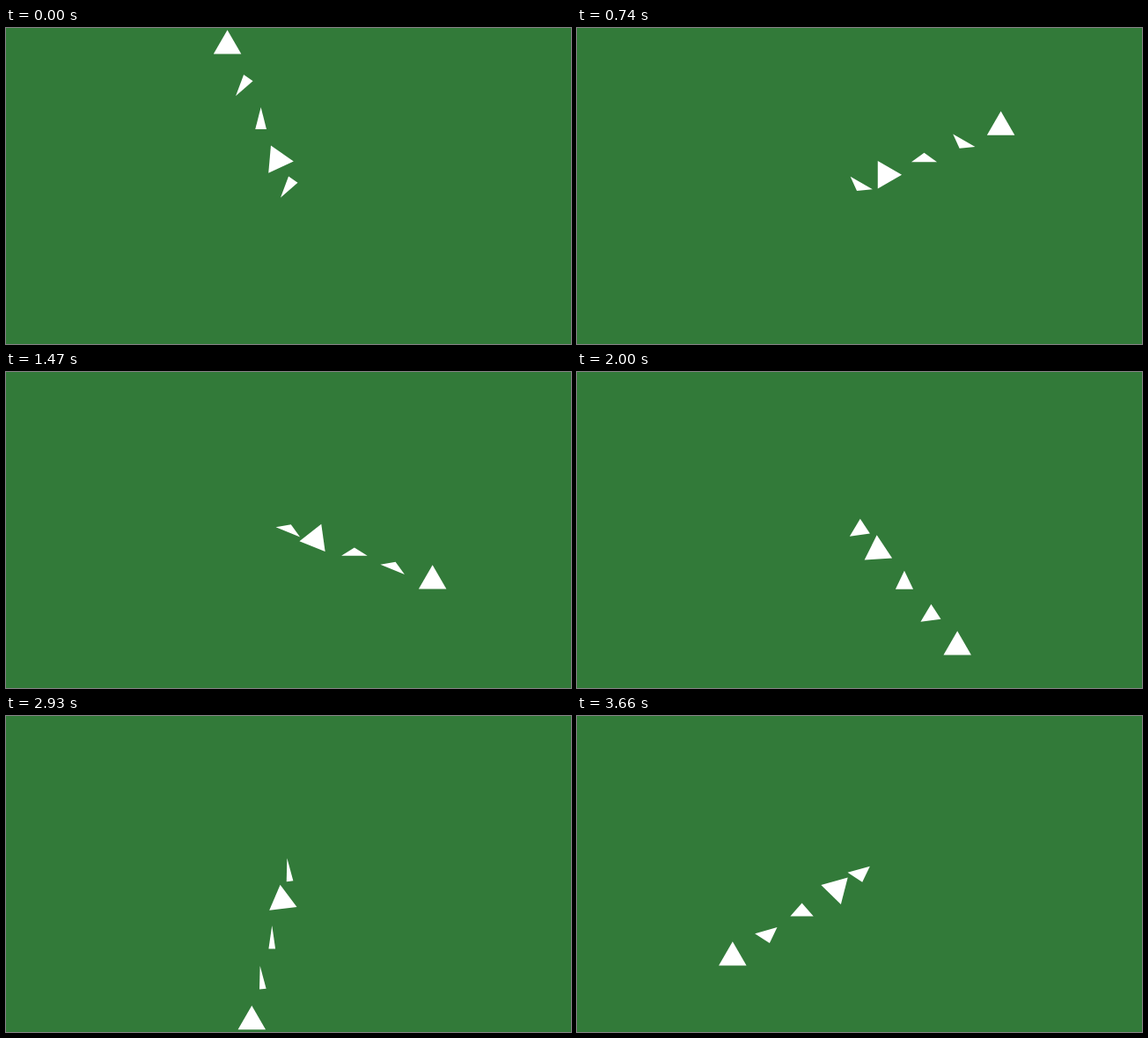
Recreate the animation shown at these times as an HTML page. Size 642 px wide and 359 px high, loop 3730 ms.

```html
<!DOCTYPE html>
<html lang="en">
<head>
<meta charset="utf-8">
<title>Triangles</title>
<style>
html, body { margin: 0; width: 100%; height: 100%; overflow: hidden; background: #327a39; }
svg { display: block; width: 642px; height: 359px; }
</style>
</head>
<body>
<svg viewBox="0 0 642 359" fill="#fff"></svg>
<script>
const LOOP = 3730, STEP = 66.5, LAST = 55;
const CENTER = { x: 321.5, y: 179 };
const RADIUS = 18.2;

// Distance along the arm, and whether each triangle spins and squashes.
const PARTS = [
  { dist: 0, spin: true, squash: true },
  { dist: 31.8, spin: true, squash: false },
  { dist: 79, spin: false, squash: true },
  { dist: 126.2, spin: true, squash: true },
  { dist: 173.3, spin: false, squash: false }
];

// Step, arm angle, spin angle (degrees)
const KEYS = [
  [1, -60.9, 381.5],
  [11, -22.5, 210],
  [22, 19.7, 22],
  [30, 50.3, -123.5],
  [37, 77.1, -250.7],
  [44, 104.1, -366.9],
  [55, 146.6, -555.6]
];
const OPENING = [-113.8, 215];

const svg = document.querySelector("svg");
const half = RADIUS * Math.sqrt(3) / 2;
const shapes = PARTS.map(() => {
  const p = document.createElementNS("http://www.w3.org/2000/svg", "polygon");
  p.setAttribute("points", `0,${-RADIUS} ${half},${RADIUS / 2} ${-half},${RADIUS / 2}`);
  return svg.appendChild(p);
});

const mix = (a, b, k) => a + (b - a) * k;

function pose(step) {
  if (step < 1) return OPENING;
  const i = Math.max(1, KEYS.findIndex(key => key[0] >= step));
  const a = KEYS[i - 1], b = KEYS[i];
  const k = (step - a[0]) / (b[0] - a[0]);
  return [mix(a[1], b[1], k), mix(a[2], b[2], k)];
}

function draw(time) {
  const step = Math.min(LAST, Math.max(0, Math.floor((time % LOOP - 1) / STEP)));
  const [arm, spin] = pose(step);
  const c = Math.cos(arm * Math.PI / 180), s = Math.sin(arm * Math.PI / 180);
  PARTS.forEach((part, i) => {
    let move = `translate(${CENTER.x + part.dist * c} ${CENTER.y + part.dist * s})`;
    if (part.spin) move += ` rotate(${spin})`;
    if (part.squash) move += ` scale(${Math.abs(c)} ${Math.abs(s)})`;
    shapes[i].setAttribute("transform", move);
  });
}

const start = performance.now();
function tick() {
  draw(performance.now() - start);
  requestAnimationFrame(tick);
}
tick();
</script>
</body>
</html>
```
